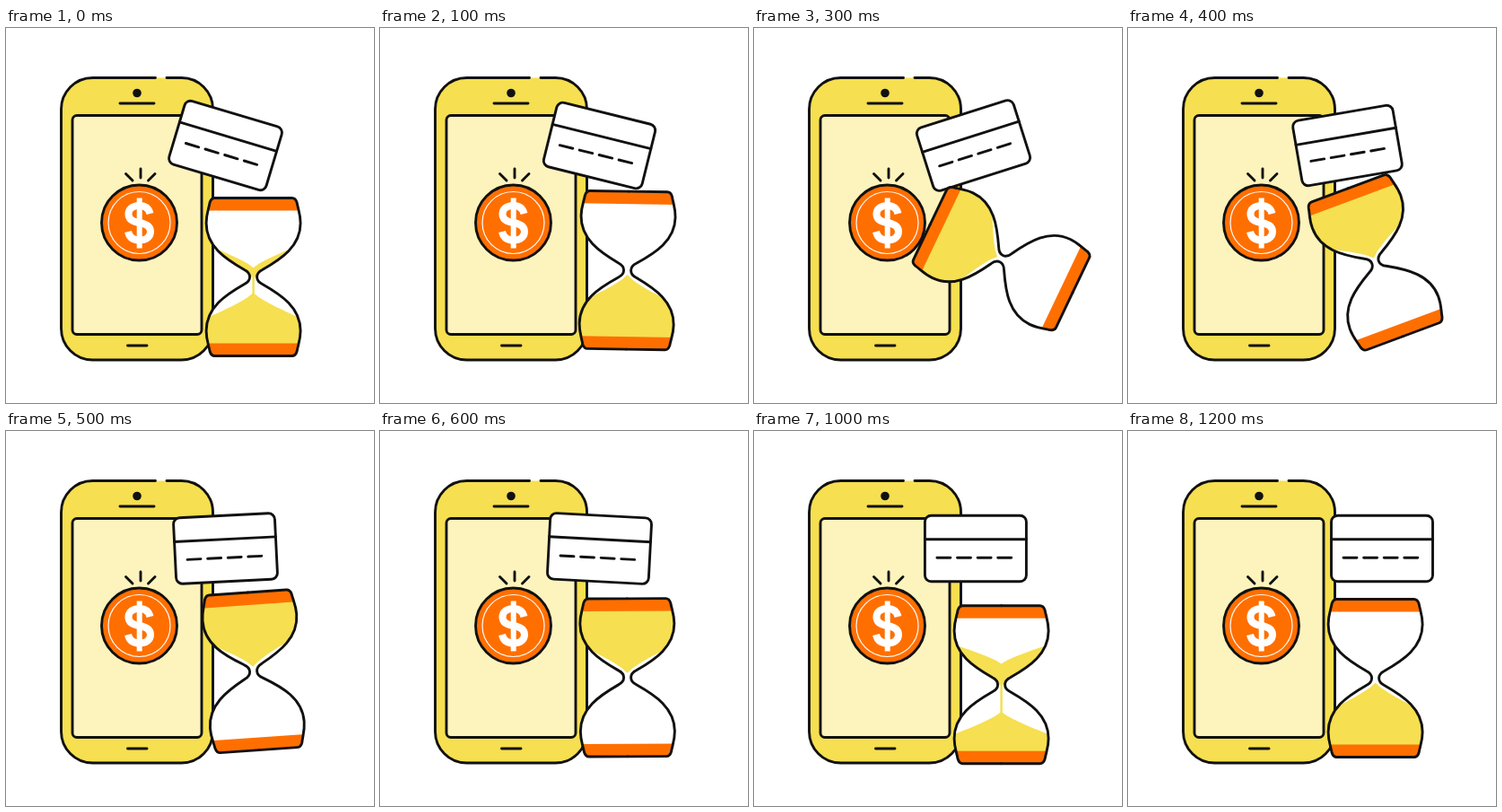
These frames come from a looping animation (410x418 px, 1300 ms). An HTML page:

```html
<!DOCTYPE html>
<html lang="en">
<head>
<meta charset="utf-8">
<title>Phone, card and hourglass</title>
<style>
  html, body { margin: 0; height: 100%; overflow: hidden; background: #fff; }
  svg { display: block; width: 100vw; height: 100vh; }
  .ink { fill: none; stroke: #111; stroke-width: 2.9; stroke-linecap: round; stroke-linejoin: round; }
  .yellow { fill: #f6df50; }
  .pale { fill: #fdf3bd; }
  .orange { fill: #ff6f00; }
  .white { fill: #fff; }
  .dollar { fill: none; stroke: #fff; stroke-width: 8; }
</style>
</head>
<body>
<svg viewBox="0 0 410 418">
  <defs>
    <path id="half" d="M0-88H43Q47-88 48.500-83C50-75 52.500-70 52.500-60C52.500-34 31-20 10-8C2-4 2 4 10 8C31 20 52.500 34 52.500 60C52.500 70 50 75 48.500 83Q47 88 43 88H0"/>
    <g id="bulbs"><use href="#half"/><use href="#half" transform="scale(-1 1)"/></g>
    <clipPath id="inside"><use href="#half"/><use href="#half" transform="scale(-1 1)"/></clipPath>
  </defs>

  <g id="phone">
    <rect class="yellow" x="61.500" y="55.500" width="169" height="314.500" rx="35"/>
    <path class="ink" d="M179 55.500H195.500A35 35 0 0 1 230.500 90.500V335A35 35 0 0 1 195.500 370H96.500A35 35 0 0 1 61.500 335V90.500A35 35 0 0 1 96.500 55.500H166.500"/>
    <rect class="pale" x="74" y="97.500" width="144" height="244" rx="5"/>
    <rect class="ink" x="74" y="97.500" width="144" height="244" rx="5"/>
    <circle cx="146" cy="72.500" r="4.800" fill="#111"/>
    <path class="ink" d="M127 84H165M135.500 354H157"/>
  </g>

  <g id="coin">
    <path class="ink" d="M150 157V167M133.500 162.500L141 170M166 162.500L158.500 170"/>
    <circle class="orange" cx="148.500" cy="217" r="42"/>
    <circle class="ink" cx="148.500" cy="217" r="42"/>
    <circle cx="148.500" cy="217" r="34.500" fill="none" stroke="#fff" stroke-width="1.200"/>
    <path class="dollar" d="M160.500 207C159 200.500 155 198 148.500 198C141 198 136.500 202 136.500 207.500C136.500 214 142 216 148.500 217C156 218.300 161 221 161 227C161 233 156 236.500 148.500 236.500C142 236.500 137.500 233.500 136 227"/>
    <path class="dollar" style="stroke-width:6" d="M148.700 189.500V245.500"/>
  </g>

  <g id="card">
    <rect class="white" x="-56.500" y="-36.800" width="113" height="73.600" rx="7"/>
    <rect class="ink" x="-56.500" y="-36.800" width="113" height="73.600" rx="7"/>
    <path class="ink" d="M-56.500-10.300H56.500"/>
    <path class="ink" stroke-dasharray="15 7.600" d="M-43 10.300H40"/>
  </g>

  <g id="glass">
    <use href="#bulbs" class="white"/>
    <g clip-path="url(#inside)">
      <path id="upper" class="yellow"/>
      <path id="lower" class="yellow"/>
      <rect id="stream" class="yellow" x="-1.200" y="-10" width="2.400"/>
      <rect class="orange" x="-60" y="-88" width="120" height="14"/>
      <rect class="orange" x="-60" y="74" width="120" height="14"/>
    </g>
    <use href="#bulbs" class="ink"/>
  </g>
</svg>

<script>
const LOOP = 1300, STEP = 100;
const el = id => document.getElementById(id);

const linear = k => k;
const smooth = k => k * k * (3 - 2 * k);
const easeIn = n => k => k ** n;
const easeOut = n => k => 1 - (1 - k) ** n;
const mix = (a, b, k) => a + (b - a) * k;

// Keys: [time, value, easing towards it]
function tween(t, ...keys) {
  const i = keys.findIndex(key => key[0] > t);
  if (i < 0) return keys[keys.length - 1][1];
  if (i === 0) return keys[0][1];
  const [t0, a] = keys[i - 1], [t1, b, ease = linear] = keys[i];
  return mix(a, b, ease((t - t0) / (t1 - t0)));
}

const cardTilt = t => tween(t, [0, 16.7], [300, -17.6, easeIn(2.3)], [800, 10, easeOut(1.5)], [1000, 0]);
const cardX = t => tween(t, [800, 244.5], [1200, 283, easeIn(4)]);
const glassY = t => tween(t, [0, 277.5], [250, 256.5, smooth], [800, 282.7, smooth], [1000, 282.7], [1200, 275.5]);
const glassTurn = t => tween(t, [0, 0], [300, 115.5, easeIn(4.4)], [700, 180, easeOut(4)]);
const poured = t => tween(t, [0, 0.8], [100, 1], [600, 1], [700, 0], [1200, 1]);

// Sand between a surface, sloping from its middle to the walls, and a base
function sandPath(middle, wall, base) {
  let d = `M-54 ${base}`;
  for (let x = -54; x <= 54; x += 6) {
    d += `L${x} ${mix(middle, wall, (Math.abs(x) / 54) ** 0.8)}`;
  }
  return d + `L54 ${base}Z`;
}

function draw(t) {
  const p = poured(t), peak = mix(68, 5, p);
  el('card').setAttribute('transform', `translate(${cardX(t)} 131) rotate(${cardTilt(t)})`);
  // After half a turn the glass looks upright again
  el('glass').setAttribute('transform', `translate(275.600 ${glassY(t)}) rotate(${glassTurn(t) % 180})`);
  el('lower').setAttribute('d', sandPath(peak, mix(84, 37, p), 88));
  el('upper').setAttribute('d', p < 1 ? sandPath(-70 * (1 - p) ** 1.2, mix(-70, -28, p), 0) : '');
  el('stream').setAttribute('height', p < 1 ? peak + 14 : 0);
}

const start = performance.now();
function tick() {
  const t = (performance.now() - start) % LOOP;
  draw(Math.floor(t / STEP) * STEP);
  requestAnimationFrame(tick);
}
tick();
</script>
</body>
</html>
```
